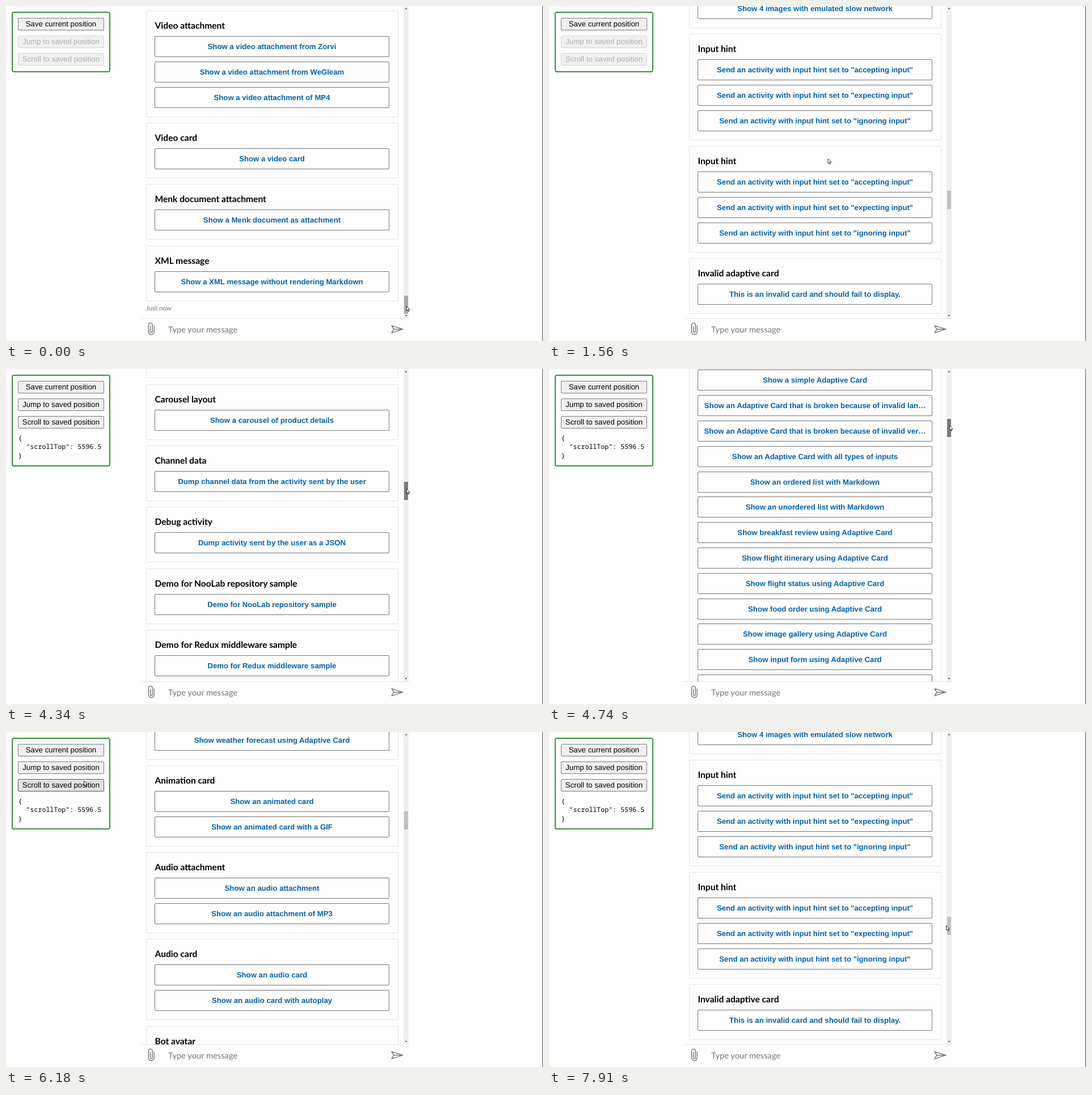
Animation, 947 px wide and 591 px high, one loop 8000 ms. Source, as an HTML page:

```html
<!DOCTYPE html>
<html lang="en">
<head>
<meta charset="utf-8">
<title>Saving and restoring scroll position</title>
<style>
  html, body { margin: 0; width: 100%; height: 100%; overflow: hidden; background: #fdfdfd; }
  body { position: relative; text-rendering: geometricPrecision; }
  div, svg, pre { position: absolute; box-sizing: border-box; margin: 0; white-space: pre; }
  svg { left: 0; top: 0; overflow: visible; }
  #view { left: 237px; top: 0; width: 474px; height: 551px; overflow: hidden; }
  #list { left: 0; top: 0; width: 464px; }
  .card { left: 10px; width: 445px; border: 1px solid #e4e4e4; border-radius: 2px; }
  .title { left: 14.5px; font: 700 15.6px/20px Lato, sans-serif; color: #000; }
  .option {
    left: 14px; width: 414px; height: 37px; border: 1px solid #767676; border-radius: 2px;
    font: 700 13.18px/35px "Liberation Sans", Arial, sans-serif; color: #0560a9; text-align: center;
  }
  #stamp { left: 10px; font: 11.4px/16px Lato, sans-serif; color: #767676; }
  #track { left: 464px; top: 0; width: 9px; height: 551px; background: #efefef; }
  #thumb { left: 1px; width: 7px; height: 32px; }
  #line { left: 237px; top: 551px; width: 474px; height: 1px; background: #e6e6e6; }
  #hint { left: 286px; top: 561px; font: 14.7px/20px Lato, sans-serif; color: #767676; }
  #edge { left: 946px; top: 0; width: 1px; height: 591px; background: #4a4a4a; }
  #panel { left: 10px; top: 10px; width: 174px; border: 2px solid #349434; border-radius: 4px; }
  .tool {
    left: 9px; width: 152px; height: 22px; border: 1px solid #7b7b7b; border-radius: 2px; background: #efefef;
    font: 13.25px/20px "Liberation Sans", Arial, sans-serif; color: #000; text-align: center;
  }
  .tool.hover { background: #e2e2e2; border-color: #555; }
  .tool.off { color: #b0b0b0; border-color: #d5d5d5; background: #f0f0f0; }
  #state { left: 9.5px; top: 103px; font: 11.65px/15.3px "Noto Sans Mono", monospace; color: #000; }
</style>
</head>
<body>
<div id="view">
  <div id="list"></div>
  <div id="track">
    <div id="thumb"></div>
    <svg width="9" height="551" fill="#505050"><path d="M2.4 5.5L4.5 3L6.6 5.5ZM2.4 545L4.5 547.5L6.6 545Z"/></svg>
  </div>
</div>
<div id="line"></div>
<div id="hint">Type your message</div>
<svg id="icons" width="947" height="591" fill="none" stroke="#767676" stroke-width="1.4" stroke-linejoin="round">
  <path d="M261.2 563.8V574.8a4.9 4.9 0 0 1-9.8 0V562.8a3.4 3.4 0 0 1 6.8 0V574.2a1.8 1.8 0 0 1-3.6 0V564.5"/>
  <path d="M680 563.8L699.8 570.2L680 576.6L683.8 570.2ZM683.8 570.2H699"/>
</svg>
<div id="panel"><pre id="state">{
  "scrollTop": 5596.5
}</pre></div>
<div id="edge"></div>
<svg id="cursor" width="8" height="12"><path d="M.5 .5V8.6L2.3 7L3.6 10L5 9.4L3.7 6.5H6.2Z" fill="#fff" stroke="#222" stroke-width=".9"/></svg>
<script>
const LOOP = 8000;
const BASE = 63.6, PITCH = 44.8;

// One section per line: heading|options
const sections = `
Adaptive Card|Show Markdown using Adaptive Card|Show a comprehensive sports club POI using Adaptive Card|Show a greeting in Arabic (for RTL)|Show a reminder using Adaptive Card|Show a rich message using Adaptive Card|Show a simple Adaptive Card|Show an Adaptive Card that is broken because of invalid lan…|Show an Adaptive Card that is broken because of invalid ver…|Show an Adaptive Card with all types of inputs|Show an ordered list with Markdown|Show an unordered list with Markdown|Show breakfast review using Adaptive Card|Show flight itinerary using Adaptive Card|Show flight status using Adaptive Card|Show food order using Adaptive Card|Show image gallery using Adaptive Card|Show input form using Adaptive Card|Show inputs using Adaptive Card|Show multiple columns using Adaptive Card|Show restaurant details using Adaptive Card|Show search results using Adaptive Card|Show solitaire using Adaptive Card|Show sports score using Adaptive Card|Show stock update using Adaptive Card|Show weather using Adaptive Card|Show weather forecast using Adaptive Card
Animation card|Show an animated card|Show an animated card with a GIF
Audio attachment|Show an audio attachment|Show an audio attachment of MP3
Audio card|Show an audio card|Show an audio card with autoplay
Bot avatar|Show a message with bot avatar
Card actions|Show a list of card actions|Show a card with multiple actions|Show a card with a single action
Card animation|Show an animated hero card
Card images|Show a card with multiple images
Carousel layout|Show a carousel of product details
Channel data|Dump channel data from the activity sent by the user
Debug activity|Dump activity sent by the user as a JSON
Demo for NooLab repository sample|Demo for NooLab repository sample
Demo for Redux middleware sample|Demo for Redux middleware sample
Echo message|Echo what you say|Echo what you say with speech
Emoji message|Show a message with emoji
Error message|Send an error message
Event activity|Send an event activity|Send an event activity with a value
File download|Show a file to download
File upload|Show upload information|Show multiple uploads
Greeting|Show a greeting message
Help|Show a list of commands|Show help text
Hero card|Show a hero card|Show a hero card with a long title|Show a hero card with rich text|Show a thumbnail card|Show a thumbnail card with a long title
Hero card actions|Show a hero card with multiple actions
Image attachment|Show an image attachment
Images on emulated slow network|Show 4 images with emulated slow network
Input hint|Send an activity with input hint set to "accepting input"|Send an activity with input hint set to "expecting input"|Send an activity with input hint set to "ignoring input"
Input hint|Send an activity with input hint set to "accepting input"|Send an activity with input hint set to "expecting input"|Send an activity with input hint set to "ignoring input"
Invalid adaptive card|This is an invalid card and should fail to display.
Layout direction|Show a message from right to left
List layout|Show a list of product details
Localization|Show a localized message|Show a localized date
Markdown message|Show a Markdown message|Show a Markdown message with images
Message back|Send a message back to the bot
OAuth card|Show an OAuth card
Pass-through message|Show a message passed through
Plain document attachment|Show a plain document as attachment
Plain text message|Show a plain text message without rendering Markdown
Proactive message|Proactively send a message later
Receipt card|Show a receipt card
SVG image attachment|Show a SVG image attachment
Sign-in card|Show a sign-in card
Speech message|Show a message with speech|Show a message with SSML
Stacked layout|Show a stacked list of attachments|Show a stacked list of images
Suggested actions|Show suggested actions|Show suggested actions with images|Show suggested actions with a value
Text format|Show a message in plain text
Thumbnail card|Show a small thumbnail card|Show a thumbnail card with rich text
Typing indicator|Show typing indicator|Show typing indicator and stop it
Unknown activity|Send an unknown activity
Upload files|Upload a file to the bot
Video attachment|Show a video attachment from Zorvi|Show a video attachment from WeGleam|Show a video attachment of MP4
Video card|Show a video card
Menk document attachment|Show a Menk document as attachment
XML message|Show a XML message without rendering Markdown
`.trim().split('\n').map(row => row.split('|'));

const $ = id => document.getElementById(id);

function add(parent, cls, top, text = '') {
  const el = document.createElement('div');
  el.className = cls;
  el.style.top = top + 'px';
  el.textContent = text;
  parent.append(el);
  return el;
}

const tops = {};
let bottom = 1060.4;
for (const [heading, ...options] of sections) {
  tops[heading] ??= bottom;
  const height = BASE + PITCH * options.length;
  const card = add($('list'), 'card', bottom);
  card.style.height = height - 10.4 + 'px';
  add(card, 'title', 16, heading);
  options.forEach((label, i) => add(card, 'option', 44 + PITCH * i, label));
  bottom += height;
}
add($('list'), '', bottom - 5.4, 'Just now').id = 'stamp';

const tools = ['Save', 'Jump to', 'Scroll to'].map((verb, i) =>
  add($('panel'), 'tool', 9 + 31 * i, i ? verb + ' saved position' : verb + ' current position'));

// Scroll offset that puts a section's top at y
const at = (heading, y) => tops[heading] - y;
const END = at('Video attachment', 8);
const MID = at('Plain text message', 57);
const SAVED = at('Input hint', 49);
const UPPER = at('Carousel layout', 26.5);
const TOP = at('Adaptive Card', -39.6);

const ease = {
  lin: u => u,
  in: u => u * u,
  out: u => 1 - (1 - u) ** 2,
  io: u => u * u * (3 - 2 * u)
};

// time, cursor x, cursor y, scroll, easing into this pose
const keys = [
  [0, 706, 529, END, 'lin'],
  [215, 706, 529, END, 'lin'],
  [595, 699.5, 419, MID, 'in'],
  [1070, 700, 334, SAVED, 'out'],
  [1175, 700, 334, SAVED, 'lin'],
  [1558.75, 491.5, 269, SAVED, 'in'],
  [2040, 110, 80, SAVED, 'out'],
  [2050, 110, 80, SAVED, 'lin'],
  [2500, 121, 33, SAVED, 'io'],
  [2890, 121, 33, SAVED, 'lin'],
  [3650, 707, 338, SAVED, 'io'],
  [3960, 707, 338, SAVED, 'lin'],
  [4348.75, 706, 211, UPPER, 'in'],
  [4920, 706, 86, TOP, 'out'],
  [5305, 231.5, 95.5, TOP, 'in'],
  [5690, 137, 86, TOP, 'out'],
  [6081, 137, 86, TOP, 'lin'],
  [6741, 137, 86, SAVED, 'out'],
  [6835, 137, 86, SAVED, 'lin'],
  [7720, 696, 341, SAVED, 'io'],
  [7725, 696, 341, SAVED, 'lin'],
  [7910, 700, 341, SAVED, 'lin'],
  [LOOP, 700, 341, SAVED, 'lin']
];

const runs = [
  [310, 1070, 9], [1270, 2040, 9], [2140, 2500, 5], [2690, 2690, 1], [2990, 3650, 8],
  [4060, 4830, 9], [4920, 5690, 9], [6080, 6830, 9], [6930, 7720, 9], [7820, 7910, 2]
];

function snap(t) {
  let s = 0;
  for (const [start, end, n] of runs) {
    if (t < start) break;
    const dt = (end - start) / (n - 1) || 0;
    s = dt ? start + dt * Math.min(n - 1, Math.floor((t - start + 8) / dt)) : start;
  }
  return s;
}

function pose(t) {
  const i = Math.max(1, keys.findIndex(k => k[0] >= t));
  const a = keys[i - 1], b = keys[i];
  const u = ease[b[4]]((t - a[0]) / (b[0] - a[0]));
  return [1, 2, 3].map(j => a[j] + (b[j] - a[j]) * u);
}

const inside = (x, y, l, t, w, h) => x >= l && x <= l + w && y >= t && y <= t + h;

function draw(time) {
  const s = snap(time);
  const [x, y, scroll] = pose(s);
  const thumbY = 10.3 + scroll / 17.17;
  const saved = s >= 2690;
  const dragging = (s >= 310 && s < 1270) || (s >= 4060 && s < 5000);
  const over = inside(x, y, 702, thumbY, 8, 32);

  $('list').style.top = -scroll + 'px';
  $('thumb').style.top = thumbY + 'px';
  $('thumb').style.background = dragging ? '#7b7b7b' : over ? '#a8a8a8' : '#c0c0c0';
  $('cursor').style.transform = `translate(${x}px, ${y}px)`;
  $('panel').style.height = saved ? '162px' : '107px';
  $('state').style.display = saved ? '' : 'none';
  tools.forEach((el, i) => {
    const off = i > 0 && !saved;
    el.classList.toggle('off', off);
    el.classList.toggle('hover', !off && inside(x, y, 21, 21 + 31 * i, 152, 22));
  });
}

function tick() {
  draw(performance.now() % LOOP);
  requestAnimationFrame(tick);
}
tick();
</script>
</body>
</html>
```
